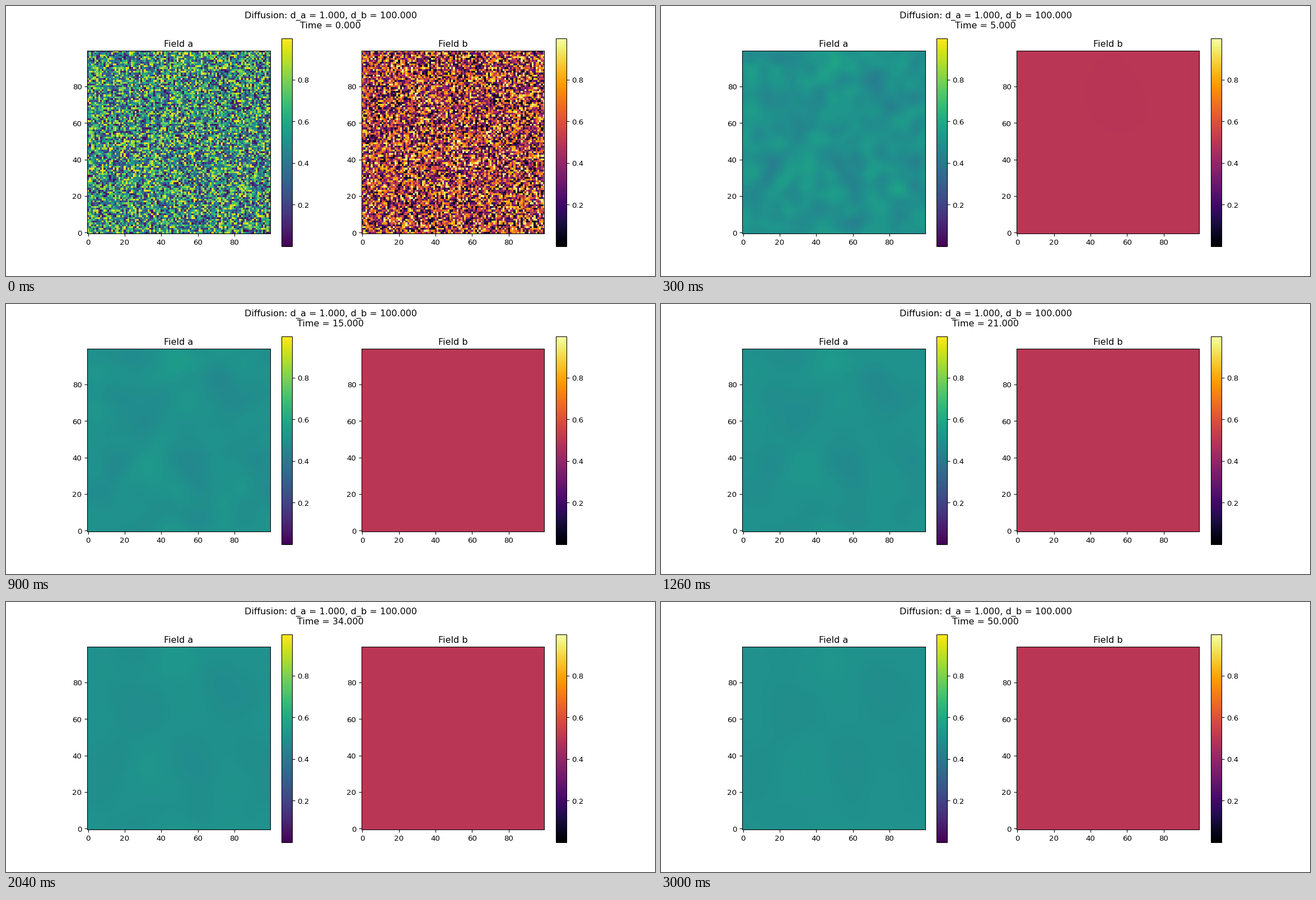
A matplotlib script for the animation above (3.06 s loop, 1159 by 483 pixels).

```python
import numpy as np
import matplotlib.pyplot as plt
from matplotlib.animation import FuncAnimation

N = 100
FRAMES, INTERVAL = 51, 60
D_A, D_B = 1.0, 100.0

# Key points: where each field stays high or low longest.
HIGH_A = (34, 34), (52, 91)
LOW_A = (57, 31), (10, 25), (30, 64), (76, 75)
HIGH_B = (55, 44), (3, 100)
LOW_B = (0, 55), (45, 98)

axis = np.arange(N)
wave = 2 * np.pi * np.fft.fftfreq(N)
K2 = wave[:, None] ** 2 + wave ** 2
rng = np.random.default_rng(7)


def periodic_offset(center):
    return (axis - center + N / 2) % N - N / 2


def spot(x, y, variance):
    r2 = periodic_offset(y)[:, None] ** 2 + periodic_offset(x) ** 2
    return np.exp(-r2 / (2 * variance))


def start_spectrum(high, low, variance, peak, cut, mean):
    """Uniform noise whose broad waves are replaced by a few soft spots."""
    spots = sum(spot(x, y, variance) for x, y in high)
    spots = spots - sum(spot(x, y, variance) for x, y in low)
    noise = np.fft.fft2(rng.random((N, N))) * (1 - np.exp(-cut * K2))
    spectrum = noise + np.fft.fft2(peak * spots)
    spectrum[0, 0] = mean * N * N
    return spectrum


def diffuse(spectrum, d, t):
    return np.fft.ifft2(spectrum * np.exp(-d * K2 * t)).real


start_a = start_spectrum(HIGH_A, LOW_A, variance=32, peak=.06, cut=30, mean=.503)
start_b = start_spectrum(HIGH_B, LOW_B, variance=120, peak=.03, cut=300, mean=.497)

fig, axes = plt.subplots(1, 2, figsize=(12.0736, 5.0355), dpi=96)


def add_panel(ax, name, cmap):
    image = ax.imshow(np.zeros((N, N)), cmap=cmap, origin="lower",
                      vmin=.0004, vmax=.9996)
    ax.set_title(f"Field {name}")
    fig.colorbar(image, ax=ax)
    return image


image_a = add_panel(axes[0], "a", "viridis")
image_b = add_panel(axes[1], "b", "inferno")
heading = fig.suptitle("")


def update(t):
    image_a.set_data(diffuse(start_a, D_A, t))
    image_b.set_data(diffuse(start_b, D_B, t))
    heading.set_text(f"Diffusion: d_a = {D_A:.3f}, d_b = {D_B:.3f}\nTime = {t:.3f}")
    return image_a, image_b, heading


anim = FuncAnimation(fig, update, frames=FRAMES, interval=INTERVAL,
                     repeat=True, repeat_delay=0)
plt.show()
```
